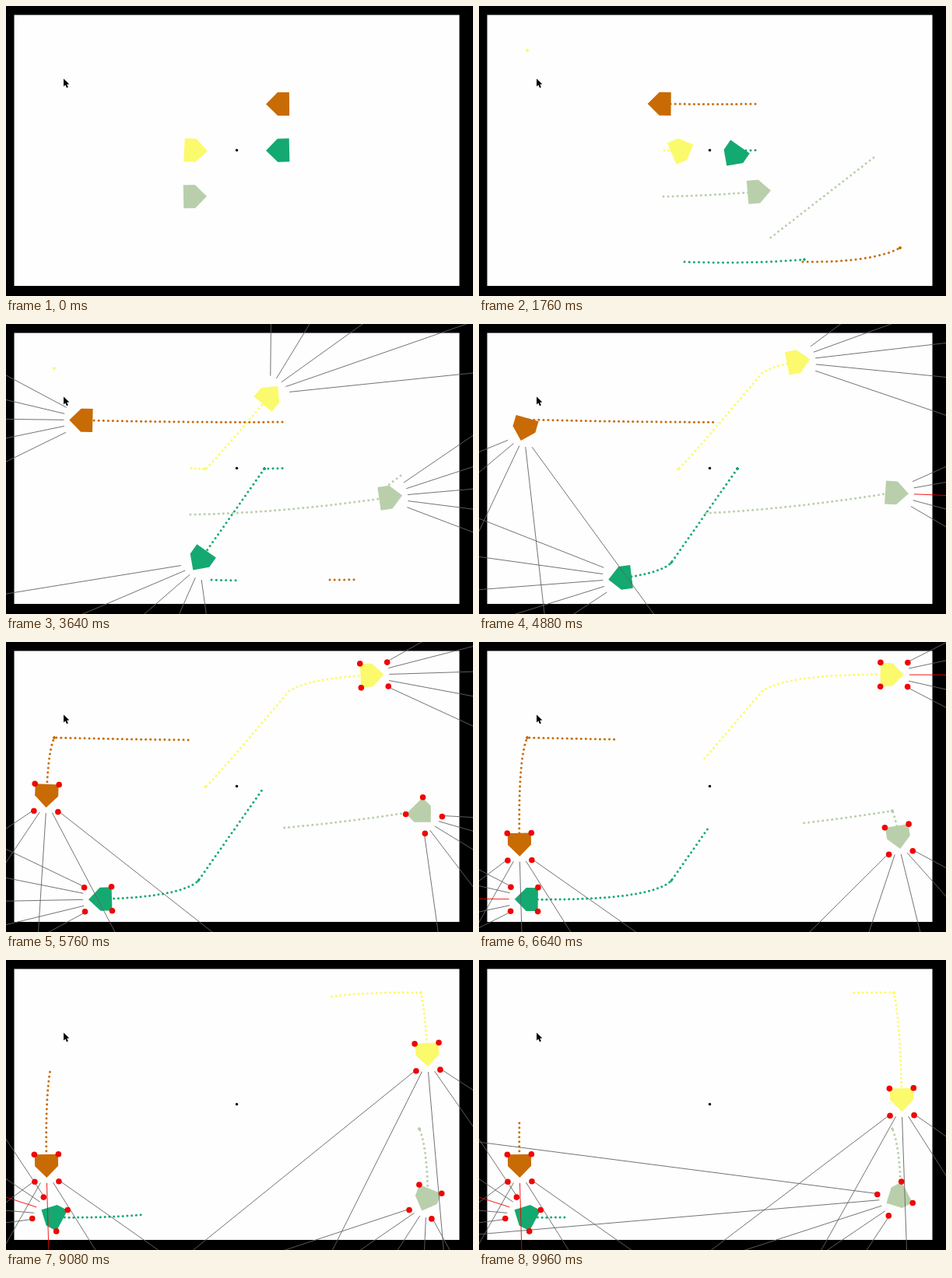
Animation, 600 px wide and 373 px high, one loop 10000 ms. Source, as an HTML page with a canvas:

```html
<!DOCTYPE html>
<html lang="en">
<head>
<meta charset="utf-8">
<title>Robots</title>
<style>
html, body { margin: 0; width: 100%; height: 100%; overflow: hidden; background: #000; }
canvas { display: block; }
</style>
</head>
<body>
<canvas id="stage" width="600" height="373"></canvas>
<script>
const ctx = document.getElementById('stage').getContext('2d');
const LOOP = 10000, START = 130;
const SAMPLE = 84, SLOTS = 48, GAP = 6.2;
const TRAILS_ON = 1440, RAYS_ON = 2720, DOTS_ON = 5640;
const SPIN = 0.047; // degrees per ms
const WALL = { left: 10.5, top: 11.5, right: 582.5, bottom: 360 };
const ASPECT = 1.64, NEAR = 59, RADIUS = 18;
const BODY = [[21, 0], [6, 15], [-9, 15], [-9, -15], [6, -15]];

const deg = a => a * 180 / Math.PI;
const rad = a => a * Math.PI / 180;
const clamp = k => Math.min(1, Math.max(0, k));
const mix = (a, b, k) => a + (b - a) * k;
const mid = (a, b) => [mix(a[0], b[0], 0.5), mix(a[1], b[1], 0.5)];
const turnBetween = (a, b) => ((b - a + 900) % 360) - 180;

// Quadratic curve walked at constant speed; at(k) gives the pose for k in 0..1
function curve(a, c, b) {
  const steps = 40, points = [], sums = [0];
  for (let i = 0; i <= steps; i++) {
    const k = i / steps;
    points.push([0, 1].map(n => mix(mix(a[n], c[n], k), mix(c[n], b[n], k), k)));
  }
  for (let i = 1; i <= steps; i++) {
    const [p, q] = [points[i - 1], points[i]];
    sums.push(sums[i - 1] + Math.hypot(q[0] - p[0], q[1] - p[1]));
  }
  const length = sums[steps];
  return {
    length,
    at(k) {
      const d = clamp(k) * length;
      let i = 1;
      while (i < steps && sums[i] < d) i++;
      const [p, q] = [points[i - 1], points[i]];
      const f = (d - sums[i - 1]) / (sums[i] - sums[i - 1] || 1);
      return {
        x: mix(p[0], q[0], f),
        y: mix(p[1], q[1], f),
        heading: deg(Math.atan2(q[1] - p[1], q[0] - p[0]))
      };
    }
  };
}

const line = (a, b) => curve(a, mid(a, b), b);
const leg = (from, to, path) => ({ from, to, path });

// Each robot drives its legs and turns on the spot between them.
// old: the previous trail still in the buffer, newest point first.
const robots = [
  {
    color: '#c86b05',
    legs: [
      leg(START, 4200, curve([355, 126], [230, 127], [62, 123])),
      leg(4780, 6700, curve([62, 123], [50, 150], [52, 259]))
    ],
    old: curve([416, 329], [505, 330], [541, 311])
  },
  {
    color: '#14a971',
    legs: [
      leg(START, 450, line([355, 185.5], [332, 186])),
      leg(1720, 3770, line([332, 186], [247, 307])),
      leg(3950, 6680, curve([247, 307], [220, 333], [64, 331]))
    ],
    rest: { from: 6720, heading: 208 },
    old: curve([264, 329], [345, 332], [418, 326])
  },
  {
    color: '#fbfa6c',
    legs: [
      leg(START, 420, line([238, 185.5], [256, 186.5])),
      leg(1950, 4230, curve([256, 186.5], [262, 183.5], [363, 64])),
      leg(4230, 6760, curve([363, 64], [395, 40], [533, 42])),
      leg(7950, 9960, curve([533, 42], [541, 75], [543, 174]))
    ],
    old: line([62, 57], [62, 57])
  },
  {
    color: '#b9cfab',
    legs: [
      leg(START, 4240, curve([237, 245], [370, 243], [531, 217])),
      leg(6230, 7450, curve([531, 217], [541, 240], [542, 303]))
    ],
    rest: { from: 8600, heading: 152 },
    old: line([507, 195], [350, 317])
  }
];

function pose({ legs, rest }, t) {
  let i = legs.length - 1;
  while (i > 0 && t < legs[i].from) i--;
  const { from, to, path } = legs[i], next = legs[i + 1];
  const p = path.at((t - from) / (to - from));
  if (t <= to) return p;
  if (next) {
    const turn = turnBetween(p.heading, next.path.at(0).heading);
    const span = Math.min(next.from - to, Math.abs(turn) / SPIN);
    if (span > 0) p.heading += turn * clamp((t - next.from) / span + 1);
  } else if (rest) {
    const turn = turnBetween(p.heading, rest.heading);
    p.heading += turn * clamp((t - rest.from) * SPIN / Math.abs(turn));
  }
  return p;
}

function place(p, [forward, side]) {
  const c = Math.cos(rad(p.heading)), s = Math.sin(rad(p.heading));
  return [p.x + forward * c - side * s, p.y + forward * s + side * c];
}

function disc(x, y, r, color) {
  ctx.fillStyle = color;
  ctx.beginPath();
  ctx.arc(x, y, r, 0, 2 * Math.PI);
  ctx.fill();
}

function polygon(points, color) {
  ctx.fillStyle = color;
  ctx.beginPath();
  points.forEach(([x, y]) => ctx.lineTo(x, y));
  ctx.fill();
}

// Ring buffer: slots not yet overwritten still show the old trail
function drawTrail(robot, t) {
  const last = Math.floor((t - START) / SAMPLE);
  const dot = ({ x, y }) => disc(x, y, 1.5, robot.color);
  for (let i = Math.max(0, last - SLOTS + 1); i <= last; i++) {
    dot(pose(robot, START + i * SAMPLE));
  }
  for (let i = last + 1; i < SLOTS; i++) {
    dot(robot.old.at((SLOTS - 1 - i) * GAP / (robot.old.length || 1)));
  }
}

// Distance to the nearest wall or robot in direction (dx, dy)
function reach(p, dx, dy, others) {
  const wx = ((dx > 0 ? WALL.right : WALL.left) - p.x) / dx;
  const wy = ((dy > 0 ? WALL.bottom : WALL.top) - p.y) / dy;
  let best = Math.min(wx, wy);
  for (const o of others) {
    const ox = o.x - p.x, oy = o.y - p.y;
    const ahead = ox * dx + oy * dy, side = ox * dy - oy * dx;
    if (ahead > 0 && Math.abs(side) < RADIUS) {
      best = Math.min(best, ahead - Math.sqrt(RADIUS ** 2 - side ** 2));
    }
  }
  return best;
}

// Five rays fan out ahead, widened by the stage's aspect ratio
function drawRays(p, others) {
  ctx.lineWidth = 0.9;
  for (let i = -2; i <= 2; i++) {
    const a = rad(p.heading + 20 * i);
    const vx = ASPECT * Math.cos(a), vy = Math.sin(a), len = Math.hypot(vx, vy);
    const dx = vx / len, dy = vy / len;
    const [x, y] = place(p, [28 - 0.75 * i * i, 8 * i]);
    const hit = i === 0 && reach(p, dx, dy, others) < NEAR;
    ctx.strokeStyle = hit ? '#f00000' : '#646464';
    ctx.beginPath();
    ctx.moveTo(x, y);
    ctx.lineTo(x + dx * 800, y + dy * 800);
    ctx.stroke();
  }
}

function drawCorners(p) {
  for (const forward of [-9, 26]) {
    for (const side of [-15.5, 15.5]) disc(...place(p, [forward, side]), 3.8, '#f00505');
  }
}

function drawCursor() {
  polygon([[74, 93.5], [74, 103.5], [76.3, 101.5], [78, 105.2], [79.8, 104.4],
    [78.2, 100.8], [81.3, 100.6]], '#000');
}

function draw(t) {
  ctx.fillStyle = '#000';
  ctx.fillRect(0, 0, 600, 373);
  ctx.fillStyle = '#fefefe';
  ctx.fillRect(WALL.left, WALL.top, WALL.right - WALL.left, WALL.bottom - WALL.top);

  const poses = robots.map(r => pose(r, t));
  if (t >= TRAILS_ON) robots.forEach(r => drawTrail(r, t));
  disc(296.5, 185.5, 1.7, '#000');
  robots.forEach((r, i) => polygon(BODY.map(v => place(poses[i], v)), r.color));
  if (t >= RAYS_ON) poses.forEach(p => drawRays(p, poses.filter(o => o !== p)));
  if (t >= DOTS_ON) poses.forEach(drawCorners);
  drawCursor();
}

const begin = performance.now();
function tick() {
  const t = Math.max(0, performance.now() - begin) % LOOP;
  draw(t < 200 ? 0 : Math.floor(t / 40) * 40);
  requestAnimationFrame(tick);
}
tick();
</script>
</body>
</html>
```
